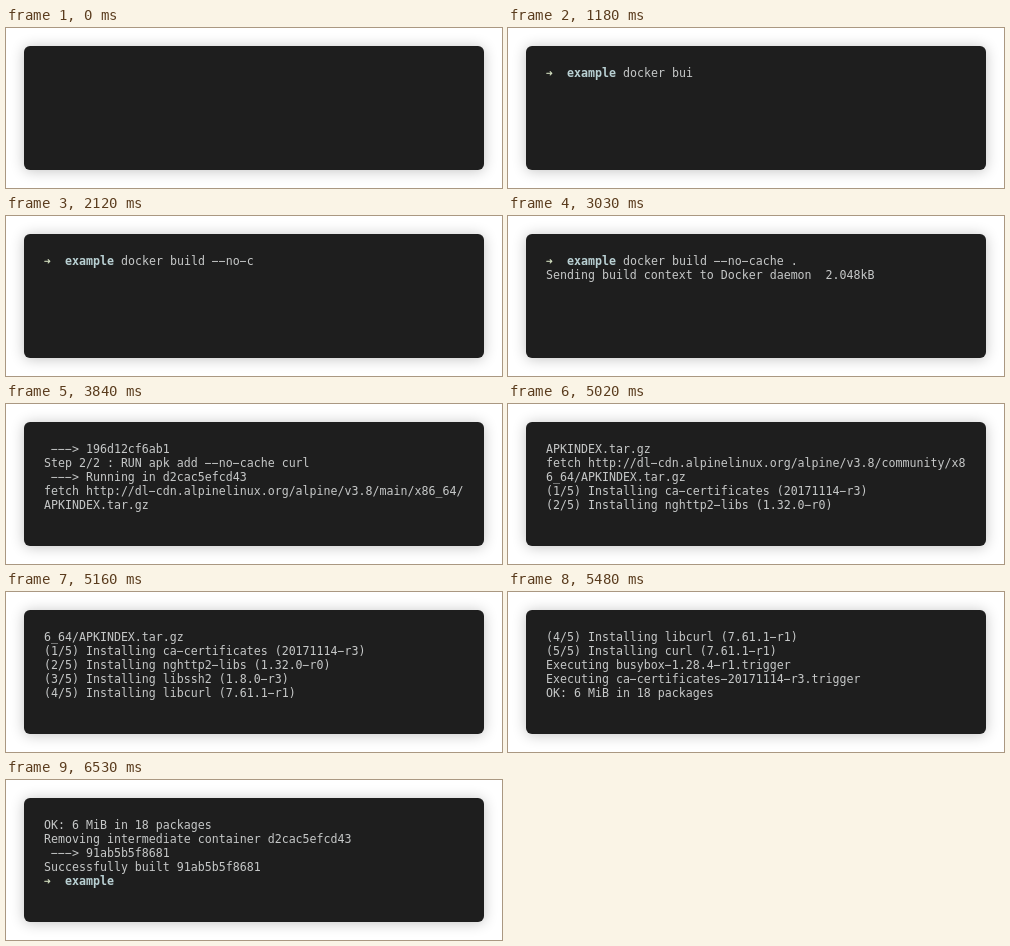
An HTML page with a canvas that plays this animation: 496x160 px, repeating every 7870 ms.

```html
<!DOCTYPE html>
<html lang="en">
<head>
<meta charset="utf-8">
<title>Terminal</title>
<style>
  html, body { margin: 0; width: 100%; height: 100%; overflow: hidden; background: #fff; }
  canvas { display: block; width: 496px; height: 160px; }
</style>
</head>
<body>
<canvas id="stage"></canvas>
<script>
const W = 496, H = 160, LOOP = 7870;
const CELL = 7, ROW = 14, LEFT = 38, BASE = 49, VISIBLE = 5;
const FONT = '11.628px "DejaVu Sans Mono", monospace';
const INK = '#c6c8c8', ARROW = '#d3dfc0', DIR = '#b9d0d3';

const canvas = document.getElementById('stage');
const dpr = window.devicePixelRatio || 1;
canvas.width = W * dpr;
canvas.height = H * dpr;
const ctx = canvas.getContext('2d');
ctx.scale(dpr, dpr);

const COMMAND = 'docker build --no-cache .';
// Typing bursts: start, ms per key, keys
const BURSTS = [
  [140, 60, 5], [580, 200, 2], [980, 100, 3],
  [1380, 200, 2], [1700, 80, 2], [1838, 58.2, 11]
];
const PROMPT = 80, NEXT_PROMPT = 6530;

const OUTPUT = [
  [3030, 'Sending build context to Docker daemon  2.048kB'],
  [3160, 'Step 1/2 : FROM alpine:3.8'],
  [3160, ' ---> 196d12cf6ab1'],
  [3320, 'Step 2/2 : RUN apk add --no-cache curl'],
  [3320, ' ---> Running in d2cac5efcd43'],
  [3840, 'fetch http://dl-cdn.alpinelinux.org/alpine/v3.8/main/x86_64/'],
  [3840, 'APKINDEX.tar.gz'],
  [4530, 'fetch http://dl-cdn.alpinelinux.org/alpine/v3.8/community/x8'],
  [4530, '6_64/APKINDEX.tar.gz'],
  [4870, '(1/5) Installing ca-certificates (20171114-r3)'],
  [5020, '(2/5) Installing nghttp2-libs (1.32.0-r0)'],
  [5090, '(3/5) Installing libssh2 (1.8.0-r3)'],
  [5160, '(4/5) Installing libcurl (7.61.1-r1)'],
  [5310, '(5/5) Installing curl (7.61.1-r1)'],
  [5370, 'Executing busybox-1.28.4-r1.trigger'],
  [5420, 'Executing ca-certificates-20171114-r3.trigger'],
  [5480, 'OK: 6 MiB in 18 packages'],
  [6390, 'Removing intermediate container d2cac5efcd43'],
  [6390, ' ---> 91ab5b5f8681'],
  [6460, 'Successfully built 91ab5b5f8681']
];

function typedKeys(t) {
  let keys = 0;
  for (const [start, step, n] of BURSTS) {
    if (t >= start) keys += Math.min(n, Math.floor((t - start) / step + 1e-6) + 1);
  }
  return keys;
}

const promptLine = text => [
  [0, '➜', ARROW, true], [3, 'example', DIR, true], [11, text, INK]
];

function linesAt(t) {
  if (t < PROMPT) return [];
  const lines = [promptLine(COMMAND.slice(0, typedKeys(t)))];
  for (const [at, text] of OUTPUT) if (t >= at) lines.push([[0, text, INK]]);
  if (t >= NEXT_PROMPT) lines.push(promptLine(''));
  return lines.slice(-VISIBLE);
}

function drawWindow() {
  ctx.fillStyle = '#fff';
  ctx.fillRect(0, 0, W, H);
  ctx.save();
  ctx.shadowColor = 'rgba(0,0,0,.24)';
  ctx.shadowBlur = 14 * dpr;
  ctx.shadowOffsetY = 1 * dpr;
  ctx.fillStyle = '#1e1e1e';
  ctx.beginPath();
  ctx.roundRect(18, 18, 460, 124, 6);
  ctx.fill();
  ctx.restore();
}

function drawLine(parts, row) {
  for (const [col, text, color, bold] of parts) {
    ctx.font = (bold ? 'bold ' : '') + FONT;
    ctx.fillStyle = color;
    // Terminal-style wide dashes
    ctx.fillText(text.replace(/-/g, '\u2212'), LEFT + col * CELL, BASE + row * ROW);
  }
}

function render(t) {
  drawWindow();
  linesAt(t).forEach(drawLine);
}

const begin = performance.now();
function tick() {
  render((performance.now() - begin) % LOOP);
  requestAnimationFrame(tick);
}
tick();
</script>
</body>
</html>
```
